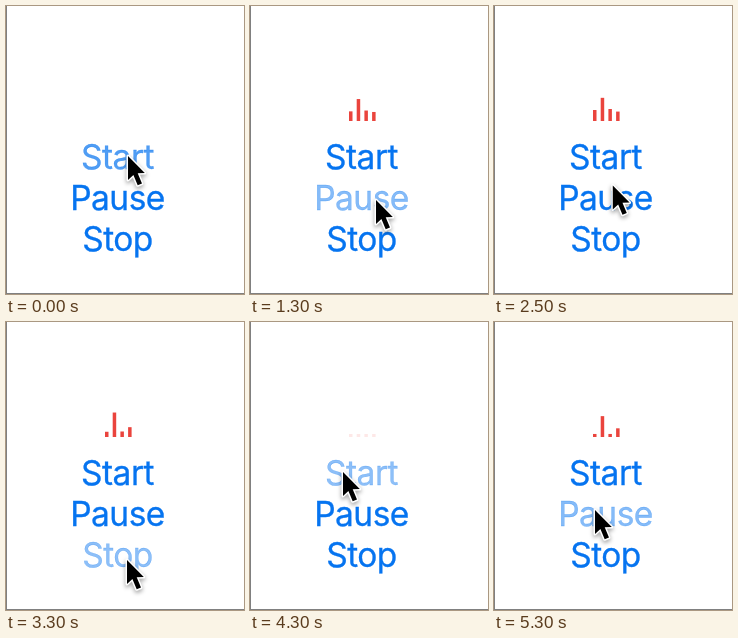
Recreate the animation shown at these times as an HTML page with a canvas. Size 238x288 px, loop 5400 ms.

```html
<!DOCTYPE html>
<html lang="en">
<head>
<meta charset="utf-8">
<title>Equalizer controls</title>
<style>
  html, body { margin: 0; width: 100%; height: 100%; overflow: hidden; background: #fff; }
  canvas { display: block; width: 238px; height: 288px; }
</style>
</head>
<body>
<canvas id="stage" width="238" height="288"></canvas>
<script>
const ctx = document.getElementById('stage').getContext('2d');
const LOOP = 5400, STEP = 100;
const BLUE = '#0674f0', RED = '#ea443d';

const buttons = [
  { label: 'Start', presses: [-50, 2050, 4210] },
  { label: 'Pause', presses: [1215, 5215] },
  { label: 'Stop', presses: [3210] }
];

// Moments when the bars start, pause, resume, stop and start again
const play = { start: 165, pause: 1550, resume: 2200, stop: 3400, again: 4350 };
const peaks = [11, 25, 12, 10];
const LOW = 3;

// The pointer rests at each stop and leaves for the next one.
const stops = [
  { arrive: 0, leave: 350, x: 122, y: 150 },
  { arrive: 1100, leave: 1400, x: 126, y: 194 },
  { arrive: 1800, leave: 2300, x: 118, y: 159 },
  { arrive: 2900, leave: 3800, x: 121, y: 238 },
  { arrive: 4100, leave: 4400, x: 93, y: 150 },
  { arrive: 4800, leave: LOOP, x: 101, y: 188 }
];
const arrow = new Path2D('M0 0V24L5.4 19 9.7 29.3 14 27.5 9.7 17.3 16.8 17.1Z');

const clamp = (v, lo = 0, hi = 1) => Math.min(hi, Math.max(lo, v));
const ramp = (t, from, to) => clamp((t - from) / (to - from));
const ease = v => v * v * (3 - 2 * v);
const mix = (a, b, k) => a + (b - a) * k;

function buttonAlpha(t, presses) {
  const dips = presses.map(p => ramp(t, p, p + 100) * (1 - ramp(t, p + 200, p + 400)));
  return 1 - 0.6 * Math.max(...dips);
}

// Time the bars have been moving, pauses left out
function playTime(t) {
  if (t > play.stop + 600) return Math.max(0, t - play.again);
  return clamp(t, play.start, play.pause) - play.start
    + clamp(t, play.resume, play.stop) - play.resume;
}

function drawBars(t) {
  const shown = ramp(t, 100, 350) * (1 - ramp(t, play.stop, play.stop + 320));
  ctx.globalAlpha = Math.max(shown, ramp(t, 4270, 4520));
  ctx.fillStyle = RED;
  const collapse = t < play.again - 100 ? ease(ramp(t, play.stop, play.stop + 200)) : 0;
  peaks.forEach((peak, i) => {
    const period = i % 2 ? 700 : 480;
    const swing = (1 - Math.cos(2 * Math.PI * playTime(t) / period)) / 2;
    const h = mix(LOW, peak, swing * (1 - collapse));
    ctx.fillRect(99 + 7.7 * i, 115 - h, 3.5, h);
  });
  ctx.globalAlpha = 1;
}

function drawButtons(t) {
  ctx.font = '33.5px Inter, Roboto, sans-serif';
  ctx.letterSpacing = '-0.5px';
  ctx.textAlign = 'center';
  ctx.fillStyle = ctx.strokeStyle = BLUE;
  ctx.lineWidth = 0.3;
  buttons.forEach(({ label, presses }, i) => {
    ctx.globalAlpha = buttonAlpha(t, presses);
    ctx.fillText(label, 111.5, 163 + 41 * i);
    ctx.strokeText(label, 111.5, 163 + 41 * i);
  });
  ctx.globalAlpha = 1;
}

function drawPointer(t) {
  const i = stops.findLastIndex(s => t >= s.arrive || t >= s.leave);
  const from = stops.findLast(s => t >= s.arrive);
  const to = stops[i + 1] || from;
  const k = ease(ramp(t, from.leave, to.arrive));
  ctx.save();
  ctx.translate(mix(from.x, to.x, k), mix(from.y, to.y, k));
  ctx.lineJoin = 'round';
  ctx.lineWidth = 3;
  ctx.strokeStyle = '#fff';
  ctx.shadowColor = 'rgba(0,0,0,0.4)';
  ctx.shadowBlur = 4;
  ctx.shadowOffsetY = 2;
  ctx.stroke(arrow);
  ctx.shadowColor = 'transparent';
  ctx.fillStyle = '#000';
  ctx.fill(arrow);
  ctx.restore();
}

function draw(now) {
  const t = Math.floor((now % LOOP) / STEP) * STEP;
  ctx.fillStyle = '#fff';
  ctx.fillRect(0, 0, 238, 288);
  drawBars(t);
  drawButtons(t);
  drawPointer(t);
  ctx.fillStyle = '#808080';
  ctx.fillRect(0, 0, 1, 288);
  ctx.fillRect(0, 287, 238, 1);
}

const origin = performance.now();
function tick() {
  draw(performance.now() - origin);
  requestAnimationFrame(tick);
}
tick();
</script>
</body>
</html>
```
